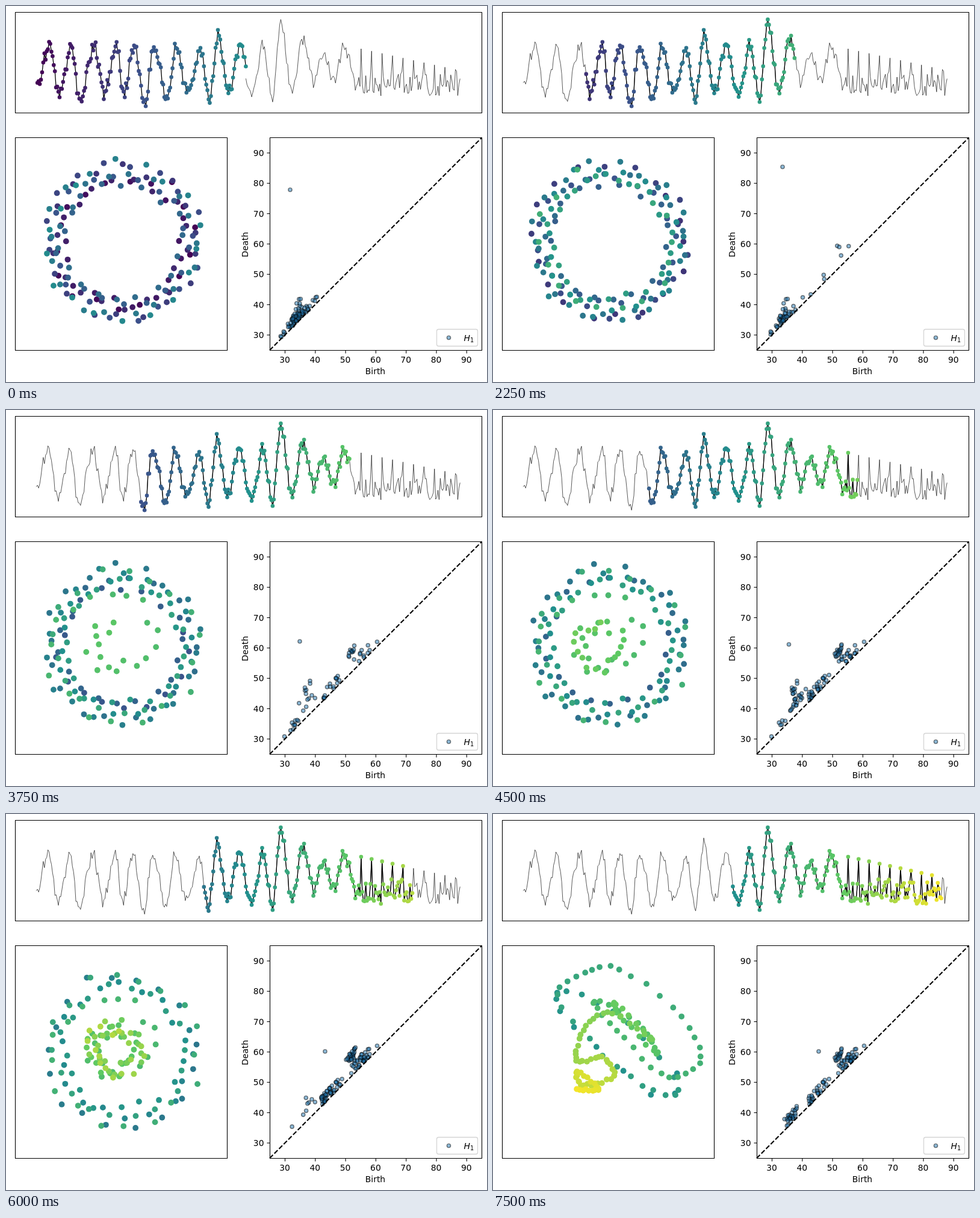
An HTML page with a canvas that plays this animation: 799x624 px, repeating every 8.25 s.

```html
<!DOCTYPE html>
<html lang="en">
<head>
<meta charset="utf-8">
<title>Sliding window persistence</title>
<style>
html, body { margin: 0; width: 100%; height: 100%; overflow: hidden; background: #fff; }
canvas { display: block; }
</style>
</head>
<body>
<canvas id="stage" width="799" height="624"></canvas>
<script>
const ctx = document.getElementById('stage').getContext('2d');
const TAU = Math.PI * 2, STEP = 750, FRAMES = 11;
const SAMPLES = 365, WIN = 180, HOP = 18, CLOUD = 156;
const FONT = '"DejaVu Sans", sans-serif';

const rnd = n => { const v = Math.sin(n * 12.9898 + 4.1) * 43758.5453; return v - Math.floor(v); };
const jit = n => rnd(n) * 2 - 1;
const lerp = (a, b, t) => a + (b - a) * t;
const clamp = t => Math.max(0, Math.min(1, t));
const smooth = t => { t = clamp(t); return t * t * (3 - 2 * t); };

// Interpolates keys of the form [position, ...values]
function keyed(keys, pos, ease = t => t) {
  let k = 0;
  while (k < keys.length - 2 && pos >= keys[k + 1][0]) k++;
  const [a, b] = [keys[k], keys[k + 1]];
  const t = ease(clamp((pos - a[0]) / (b[0] - a[0])));
  return a.slice(1).map((v, c) => lerp(v, b[c + 1], t));
}

const VIRIDIS = [
  [0, 68, 1, 84], [1, 59, 82, 139], [2, 33, 144, 141], [3, 93, 201, 99], [4, 253, 231, 37]];
const viridis = v => `rgb(${keyed(VIRIDIS, clamp(v) * 4).map(Math.round)})`;

// Oscillation between turning points that fades into noise with small spikes
const TURNS = [
  [0, 130], [10, 64], [19, 150], [29, 66], [36, 156], [49, 66], [57, 144], [68, 64], [74, 148],
  [83, 64], [92, 160], [100, 70], [112, 155], [119, 64], [129, 146], [140, 78], [148, 153],
  [155, 50], [165, 143], [174, 64], [185, 155], [195, 64], [203, 156], [210, 30], [220, 146],
  [229, 54], [238, 126], [247, 74], [255, 126], [264, 70], [272, 100]];
const sx = i => 50.3 + i * 1.934;
const signal = Array.from({ length: SAMPLES }, (_, i) => {
  if (i < 272) return keyed(TURNS, i, smooth)[0] + 11 * jit(i);
  if (i % 9 === 0) return lerp(68, 102, (i - 272) / 80);
  return 129 + 21 * jit(i);
});

// Embedding: a ring whose radius swells slowly, then collapses inwards
function ringPoint(i, frame) {
  const fall = smooth((i - 219) / 18);
  const swell = 115 - 15 * Math.cos(TAU * (i - 27) / 78) + 10 * jit(i + 500);
  const r = lerp(swell, 38 + 15 * jit(i + 900), fall);
  const turn = -10 * Math.abs(Math.sin(frame * Math.PI / 5));
  const a = (20.4 * (i - 227) - 100 + 3 * jit(i + 300) + turn) * TAU / 360;
  return [193 - 12 * fall + r * Math.cos(a), 391 + r * Math.sin(a)];
}

// Closing embedding: a smooth curve through a few points
const CURVE = [
  [203, 328], [275, 390], [312, 450], [270, 467], [189, 401], [117, 336], [108, 296], [166, 308],
  [240, 361], [308, 455], [264, 458], [187, 403], [108, 304], [150, 264], [213, 258], [308, 332],
  [345, 405], [289, 436], [213, 367], [168, 310], [243, 349], [272, 397], [211, 336], [205, 316],
  [265, 376], [194, 328], [150, 361], [140, 410], [182, 404], [200, 436], [150, 450], [140, 428],
  [174, 456], [140, 458]];
function curvePoint(j) {
  const last = CURVE.length - 1, t = last * Math.pow(j / (CLOUD - 1), 0.6);
  const k = Math.min(last - 1, Math.floor(t)), u = t - k;
  const at = n => CURVE[Math.max(0, Math.min(last, n))];
  return [0, 1].map(c => {
    const [p, q, r, s] = [at(k - 1)[c], at(k)[c], at(k + 1)[c], at(k + 2)[c]];
    return q + u / 2 * (r - p + u * (2 * p - 5 * q + 4 * r - s + u * (3 * (q - r) + s - p))) + 2 * jit(j * 2 + c);
  });
}

// Groups in the diagram that grow and fade over the frames
const GROUPS = [
  { x: 479, h: 10, len: 9, n: 45, peak: 0, width: 4 },
  { x: 500, h: 7, len: 13, n: 35, peak: 1, width: 1.8 },
  { x: 484, h: 29, len: 4, n: 8, peak: 1, width: 3 },
  { x: 460, h: 4, len: 5, n: 5, peak: 0, width: 4 },
  { x: 500, h: 48, len: 6, n: 10, peak: 6, width: 1.4 },
  { x: 505, h: 20, len: 10, n: 22, peak: 6.5, width: 1.3 },
  { x: 535, h: 9, len: 16, n: 42, peak: 8, width: 3 },
  { x: 573, h: 32, len: 7, n: 26, peak: 8, width: 3 },
  { x: 594, h: 12, len: 16, n: 40, peak: 9, width: 3.5 },
  { x: 494, h: 11, len: 11, n: 28, peak: 10, width: 0.9 }];
// Most persistent point: frame, x, y
const STRONGEST = [
  [0, 472, 305], [1, 481, 305], [3, 481, 267], [5, 488, 384], [7, 495, 394], [8, 530, 394], [10, 541, 394]];

function diagram(frame) {
  const pts = [keyed(STRONGEST, frame)];
  GROUPS.forEach((g, c) => {
    const n = Math.round(g.n * Math.exp(-(((frame - g.peak) / g.width) ** 2)));
    for (let k = 0; k < n; k++) {
      const s = c * 197 + k * 3;
      const x = g.x + g.len * (jit(s) + jit(s + 1)) * 0.8;
      const h = g.h + Math.min(g.h * 0.85, 9) * jit(s + 2);
      pts.push([x, 1009 - x - h]);
    }
  });
  return pts;
}

function dot(x, y, r, fill) {
  ctx.beginPath();
  ctx.arc(x, y, r, 0, TAU);
  ctx.fillStyle = fill;
  ctx.fill();
}
function outlinedDot(x, y) {
  dot(x, y, 3.1, 'rgba(31,119,180,.5)');
  ctx.strokeStyle = 'rgba(0,0,0,.5)';
  ctx.lineWidth = 1.4;
  ctx.stroke();
}
function line(pts, width, dash = []) {
  ctx.beginPath();
  pts.forEach(([x, y]) => ctx.lineTo(x, y));
  ctx.strokeStyle = '#000';
  ctx.lineWidth = width;
  ctx.setLineDash(dash);
  ctx.stroke();
  ctx.setLineDash([]);
}
function box(x, y, w, h) {
  ctx.strokeStyle = '#000';
  ctx.lineWidth = 1.1;
  ctx.strokeRect(x + 0.5, y + 0.5, w, h);
}
function text(str, x, y, align = 'center', font = '13.9px ') {
  ctx.font = font + FONT;
  ctx.textAlign = align;
  ctx.fillStyle = '#000';
  ctx.fillText(str, x, y);
}

function drawSignal(frame) {
  const start = frame * HOP, shift = frame ? 0 : 1;
  const thin = signal.map((y, i) => [sx(i), y]);
  line(frame ? thin : thin.slice(WIN), 0.65);
  const pts = signal.slice(start, start + WIN).map((y, k) => [sx(start + k + shift), y]);
  line(pts, 1.3);
  pts.forEach(([x, y], k) => dot(x, y, 3.3, viridis((start + k) / 364)));
  box(15, 10, 775, 167);
}

function drawCloud(frame) {
  const start = frame * HOP;
  for (let j = 0; j < CLOUD; j++) {
    const [x, y] = frame === FRAMES - 1 ? curvePoint(j) : ringPoint(start + j, frame);
    dot(x, y, 4.9, viridis((start + j * WIN / CLOUD) / 364));
  }
  box(15, 218, 352, 353);
}

function drawDiagram(frame) {
  diagram(frame).forEach(([x, y]) => outlinedDot(x, y));
  line([[438, 571.3], [790.3, 218.5]], 2.1, [7.7, 3.3]);
  box(438, 218, 352, 353);
  for (let k = 0; k < 7; k++) {
    const x = 463.5 + k * 50.3, y = 546 - k * 50.35, label = String(30 + k * 10);
    line([[x, 571.5], [x, 576.5]], 1.1);
    line([[433.5, y], [438.5, y]], 1.1);
    text(label, x - 0.5, 592);
    text(label, 428.5, Math.round(y + 5), 'right');
  }
  text('Birth', 613.5, 611);
  ctx.save();
  ctx.translate(402, 396);
  ctx.rotate(-Math.PI / 2);
  text('Death', 0, 0);
  ctx.restore();

  ctx.beginPath();
  ctx.roundRect(715.5, 536.5, 68, 28, 3);
  ctx.fillStyle = 'rgba(255,255,255,.8)';
  ctx.fill();
  ctx.strokeStyle = '#d4d4d4';
  ctx.lineWidth = 1.3;
  ctx.stroke();
  outlinedDot(735.5, 550.5);
  text('H', 760.5, 555.5, 'left', 'oblique 13.9px ');
  text('1', 771, 558, 'left', '9.7px ');
}

function draw(now) {
  const frame = Math.floor(now / STEP) % FRAMES;
  ctx.fillStyle = '#fff';
  ctx.fillRect(0, 0, 799, 624);
  ctx.lineJoin = 'round';
  drawSignal(frame);
  drawCloud(frame);
  drawDiagram(frame);
}
function tick() {
  draw(performance.now());
  requestAnimationFrame(tick);
}
tick();
</script>
</body>
</html>
```
